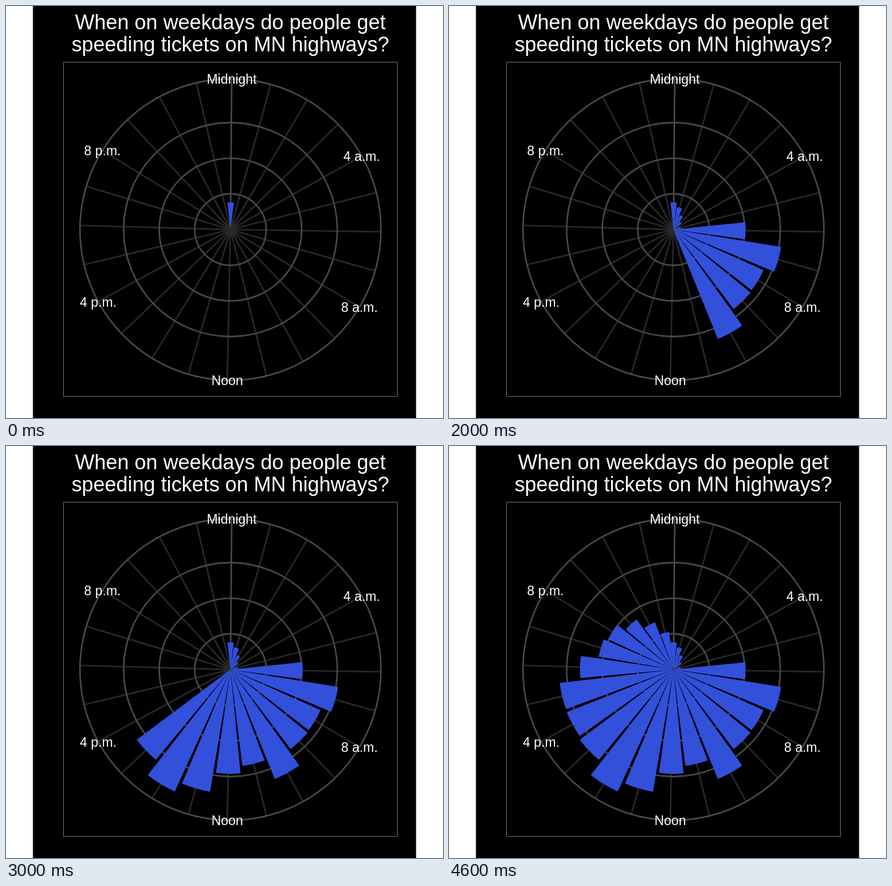
Write an HTML page that moves like this. It is 771 px wide and 726 px high and loops after 4.8 s.

```html
<!DOCTYPE html>
<html lang="en">
<head>
<meta charset="utf-8">
<title>Speeding tickets by hour</title>
<style>
  @property --n { syntax: "<number>"; inherits: true; initial-value: 0; }
  html, body { margin: 0; width: 100%; height: 100%; overflow: hidden; background: #fff; }
  svg { display: block; font-family: "Liberation Sans", Arial, sans-serif; }
  text { fill: #fff; text-anchor: middle; }
  .title { font-size: 36.4px; }
  .label { font-size: 23.3px; }
  .grid { fill: none; stroke-width: 2.8; }
  .spoke { stroke: #282828; }
  .ring, .midnight { stroke: #484848; }
  /* --n counts the hours shown; each wedge switches on when its turn comes */
  #bars { fill: #3350db; animation: count 4.8s steps(24, end) infinite; }
  #bars path { opacity: clamp(0, var(--n) - var(--i) + 1.01, 1); }
  @keyframes count { from { --n: 0; } to { --n: 24; } }
</style>
</head>
<body>
<svg width="771" height="726" viewBox="0 0 771 726">
  <rect x="47.5" width="676" height="726"/>
  <text class="title" x="395.8" y="41">When on weekdays do people get</text>
  <text class="title" x="395.8" y="80.3">speeding tickets on MN highways?</text>
  <rect x="101.5" y="99" width="589" height="589" fill="none" stroke="#7f7f7f"/>
  <g id="grid" class="grid"></g>
  <g id="bars"></g>
  <g id="labels"></g>
</svg>
<script>
  const CX = 396, CY = 394, R = 265.5;
  const HOUR = 360 / 23.9, START = 0.476, HALF = 0.45;
  const radii = [48, 40, 28, 17.8, 5.6, 13, 127.5, 192.5, 174.3, 175.6, 208, 171,
                 183.7, 218.2, 236.2, 206.4, 202.5, 202, 165, 133.8, 126.5, 110, 89.7, 66.7];
  const labels = { 0: "Midnight", 4: "4 a.m.", 8: "8 a.m.", 12: "Noon", 16: "4 p.m.", 20: "8 p.m." };

  function add(parent, tag, attrs) {
    const el = document.createElementNS("http://www.w3.org/2000/svg", tag);
    for (const key in attrs) el.setAttribute(key, attrs[key]);
    return document.getElementById(parent).appendChild(el);
  }

  // Point on the dial, clockwise from the top
  function polar(hour, r) {
    const a = (START + hour * HOUR) * Math.PI / 180;
    return [CX + r * Math.sin(a), CY - r * Math.cos(a)];
  }

  radii.forEach((r, hour) => {
    const [x2, y2] = polar(hour, R);
    add("grid", "line", { class: hour ? "spoke" : "midnight", x1: CX, y1: CY, x2, y2 });
    const from = polar(hour - HALF, r), to = polar(hour + HALF, r);
    add("bars", "path", {
      d: `M${CX} ${CY}L${from}A${r} ${r} 0 0 1 ${to}Z`,
      style: `--i:${hour}`
    });
  });

  for (const r of [63, 125.7, 188.5, R]) add("grid", "circle", { class: "ring", cx: CX, cy: CY, r });

  for (const hour in labels) {
    const [x, y] = polar(+hour, R);
    add("labels", "text", { class: "label", x, y: y + 8.8 }).textContent = labels[hour];
  }
</script>
</body>
</html>
```
